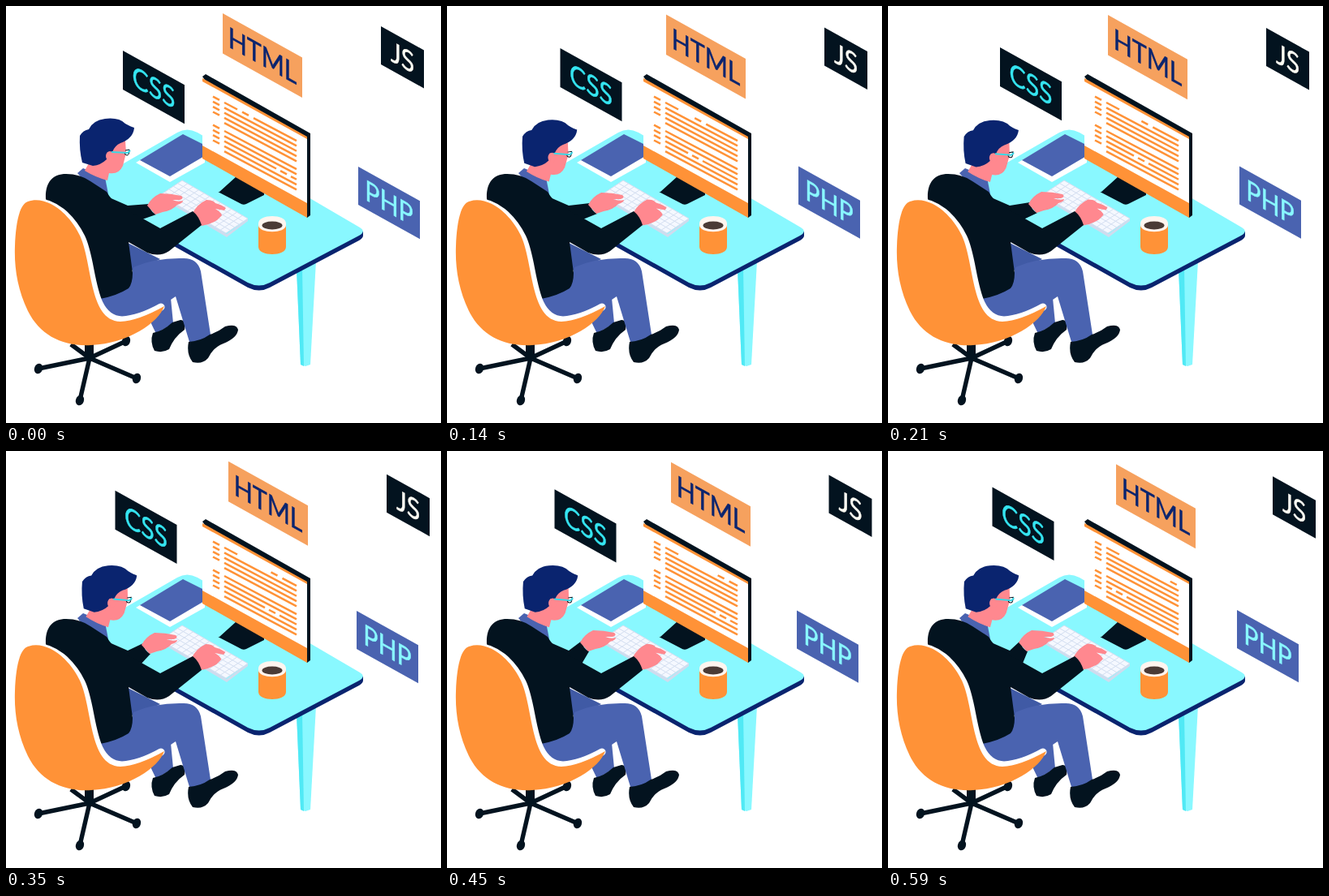
Write an HTML page that moves like this. It is 536 by 514 pixels and loops after 0.66 s.

```html
<!DOCTYPE html>
<html lang="en">
<head>
<meta charset="utf-8">
<title>Developer at a desk</title>
<style>
  html, body { margin: 0; width: 100%; height: 100%; overflow: hidden; background: #fff; }
  svg { display: block; width: 536px; height: 514px; }
  text { font: 35px Lato, sans-serif; text-anchor: middle; stroke-width: .5px; }
  .navy { fill: #0a246f; }
  .blue { fill: #4a63b0; }
  .black { fill: #03131f; }
  .cyan { fill: #89f8ff; }
  .orange { fill: #ff9237; }
  .skin { fill: #ff888f; }
  .white { fill: #fff; }
</style>
</head>
<body>
<svg viewBox="0 0 536 514">
  <!-- desk -->
  <path class="cyan" d="M358 324L382 314L375 442L369 444L363 442Z"/>
  <path fill="#50e9f5" d="M358 324L365 321L367 444L363 442Z"/>
  <path class="navy" d="M100 228L430 275L440 278V283Q440 286 435 289L325 347Q312 354 298 347L100 236Z"/>
  <path class="cyan" d="M211 156Q223 149 236 156L436 273Q444 278 435 283L325 341Q312 348 298 341L100 230V220Z"/>

  <!-- tablet -->
  <path class="white" d="M160 193L217 160L245 175V193L202 217Z"/>
  <path class="blue" d="M165 190L218 158L246 172V184L202 210Z"/>

  <!-- monitor -->
  <path class="black" d="M263 229L284 210L318 230V233L296 244Q292 246 288 243L263 230Q260 229 263 229Z"/>
  <path class="black" d="M242 87L246 84L375 157V258L371 261Z"/>
  <path class="orange" d="M242 89L371 161V261L242 188Z"/>
  <path class="white" d="M242 93L371 164V243L242 172Z"/>
  <path id="code" fill="none" stroke="#ff9237" stroke-width="2.5"/>

  <!-- keyboard -->
  <path fill="#cfdcee" d="M190 232L272 281L298 262V265L272 285L190 236Z"/>
  <g transform="matrix(81 47 -27 18 217 215)">
    <rect width="1" height="1" fill="#f5f8ff"/>
    <path id="keys" fill="none" stroke="#d3def0" stroke-width="1" vector-effect="non-scaling-stroke"/>
  </g>

  <!-- mug -->
  <path class="orange" d="M311 269V297C311 309 345 309 345 297V269Z"/>
  <path fill="#fff5ef" d="M311 268C311 256 345 256 345 268V270C345 281 311 281 311 270Z"/>
  <ellipse cx="328" cy="270.5" rx="12.5" ry="5" fill="#4b3b36"/>

  <!-- far arm -->
  <path id="farArm" class="black"/>
  <path id="farHand" class="skin" d="M174 246Q179 236 190 231Q203 231 216 234Q220 237 214 239L205 239Q212 242 218 240Q218 243 211 245Q205 252 193 254L184 257Z"/>

  <!-- legs -->
  <path fill="#405aa5" d="M150 292L190 312L160 327L150 324Z"/>
  <path class="blue" d="M173 379L203 360L206 391L185 404Z"/>
  <path class="black" d="M181 403Q193 401 205 390L215 387Q222 387 220 399Q207 408 201 423Q193 428 183 425Q177 414 181 403Z"/>
  <path class="blue" d="M112 358L153 338L157 322Q184 310 219 311Q236 311 240 327L252 405Q240 415 226 414L209 358Q188 373 144 386L118 377Z"/>
  <path class="black" d="M225 414Q240 413 251 405Q261 402 270 395Q284 391 286 399Q285 409 268 416Q255 421 249 434Q242 442 230 439Q222 429 225 414Z"/>

  <!-- head -->
  <path class="blue" d="M88 206L95 200L122 211L126 232L104 224Z"/>
  <g id="head">
    <path class="skin" d="M104 190L132 166H147L148 181L144 197Q139 208 127 206L125 215Q110 211 97 203Z"/>
    <path class="navy" d="M91 160Q95 153 102 152Q107 141 122 139Q139 137 147 145Q154 149 158 150Q157 163 141 169Q134 172 131 180L125 180L124 189Q117 196 107 197L94 193Q90 177 91 160Z"/>
    <ellipse class="skin" cx="128" cy="185" rx="5" ry="6"/>
    <path fill="none" stroke="#03131f" d="M146 180q0 4 3 4t3-7l-5 1"/>
    <path fill="none" stroke="#39d8e6" stroke-width="2" d="M130 180L150 181L153 178"/>
  </g>

  <!-- near arm and body -->
  <path id="nearHand" class="skin" d="M230 255Q236 244 247 239Q255 239 258 243Q266 245 271 249L269 252L258 250Q265 254 266 258L260 264Q250 270 241 271Z"/>
  <path class="black" d="M49 238C48 218 57 207 74 207Q91 207 104 216L124 229Q130 240 140 246L190 274L230 253Q237 258 241 270L201 302Q189 310 174 304L151 291L156 329Q156 342 151 348Q137 357 116 361L85 300Z"/>

  <!-- chair -->
  <g class="black">
    <path d="M97 413H108V434H97Z"/>
    <path id="spokes" fill="none" stroke="#03131f" stroke-width="5.5"/>
    <g id="casters"></g>
  </g>
  <path fill="none" stroke="#fff" stroke-width="9" stroke-linecap="round" d="M32 241C60 240 81 261 93 285C109 317 102 386 143 387Q164 386 191 371"/>
  <path class="orange" d="M27 241C50 233 77 255 90 281C107 313 101 388 141 389Q163 388 195 370C188 390 151 416 105 418C70 420 42 406 27 376C14 349 10 322 11 296C12 266 17 244 27 241Z"/>

  <g id="signs"></g>
</svg>
<script>
const $ = id => document.getElementById(id);
const LOOP = 660;
const starts = [0, 70, 140, 210, 280, 350, 450, 520, 590];

const signs = [
  { label: 'CSS', x: 144, y: 55, w: 76, h: 48, fill: '#03131f', ink: '#35e5f1',
    dx: [0, -2.5, -4.5, -6, -7.5, -9.5, -11.5, -13.5, -15.5], rise: .67 },
  { label: 'HTML', x: 267, y: 9, w: 98, h: 49.5, fill: '#f6a15e', ink: '#0a246f',
    dx: [0, 1.5, 3, 4, 5, 7, 9, 11.5, 14], rise: .52 },
  { label: 'JS', x: 462, y: 25, w: 53, h: 47, fill: '#03131f', ink: '#fffdf4',
    dx: [0, 1.5, 3, 4, 5.5, 7, 8.5, 10, 12], rise: .52 },
  { label: 'PHP', x: 434, y: 198, w: 76, h: 47, fill: '#4a63b0', ink: '#89f8ff',
    dx: [0, -.5, -1, -1, -1.5, -2, -3, -3.5, -4], rise: .5 }
];
$('signs').innerHTML = signs.map(({ label, w, h, fill, ink }) => `<g>
  <rect width="${w / .866}" height="${h}" fill="${fill}"/>
  <text x="${w / 1.732}" y="${h / 2 + 12.5}" fill="${ink}" stroke="${ink}">${label}</text></g>`).join('');
const signNodes = [...$('signs').children];

const hub = [103, 434];
const feet = [[40, 447], [91, 486], [161, 459], [148, 413]];
$('spokes').setAttribute('d', [...feet, [80, 417]].map(p => `M${hub}L${p}`).join(''));
$('casters').innerHTML = feet.map(([x, y]) =>
  `<ellipse cx="${x}" cy="${y}" rx="5" ry="6.5" transform="rotate(20 ${x} ${y})"/>`).join('');

let grid = '';
for (let i = 0; i <= 12; i++) grid += `M${i / 12} 0V1`;
for (let i = 0; i <= 5; i++) grid += `M0 ${i / 5}H1`;
$('keys').setAttribute('d', grid);

// One line of code in the plane of the screen; y is its height at x = 269.
const dash = (y, from, to) =>
  `M${from} ${y + (from - 269) * .53}L${to} ${y + (to - 269) * .53}`;

function codeLines(cursors) {
  let d = '';
  [119, 154].forEach((top, block) => {
    const x = cursors[block];
    for (let row = 0; row < 5; row++) {
      const y = top + row * 6.3;
      if (row < 4) d += dash(y, 255, 263);
      if (row || block) {
        if (block && row === 2) {
          d += dash(y, 269, x - 5) + dash(y, x, x + 8);
          if (x < 344) d += dash(y, x + 13, 358);
        } else d += dash(y, 269, 358);
      } else {
        d += dash(y, 269, 285) + dash(y, x, x + 8);
        if (x < 343) d += dash(y, x + 14, 358);
      }
    }
  });
  return d;
}

const secondCursor = [338, 345, 302, 308, 314, 324, 336, 346, 281];
const nod = [0, .35, .7, .9, 1, 1, 1, 1, 1];
const handX = [0, 0, 0, -1, -3, -7, -10, -12, -13];
const handY = [0, 0, -1, -2, -4, -7, -10, -10, -10];
const move = (node, x, y) => node.setAttribute('transform', `translate(${x} ${y})`);

function draw(step) {
  signs.forEach(({ x, y, dx, rise }, i) => {
    const shift = dx[step];
    signNodes[i].setAttribute('transform',
      `matrix(.866 .482 0 1 ${x + shift} ${y + shift * rise})`);
  });

  $('code').setAttribute('d', codeLines([291 + 7.1 * step, secondCursor[step]]));

  const n = nod[step];
  $('head').setAttribute('transform', `translate(${n} ${1.8 * n}) rotate(${2 * n} 112 215)`);

  const hx = handX[step], hy = handY[step];
  move($('farHand'), hx, hy);
  $('farArm').setAttribute('d', `M118 232L150 246L${176 + hx} ${244 + hy}
    Q${177 + hx} ${253 + hy} ${185 + hx} ${257 + hy}L165 264L142 262Z`);
  move($('nearHand'), -.15 * step, -.2 * step);
}

function tick() {
  const t = performance.now() % LOOP;
  draw(starts.filter(s => s <= t).length - 1);
  requestAnimationFrame(tick);
}
tick();
</script>
</body>
</html>
```
